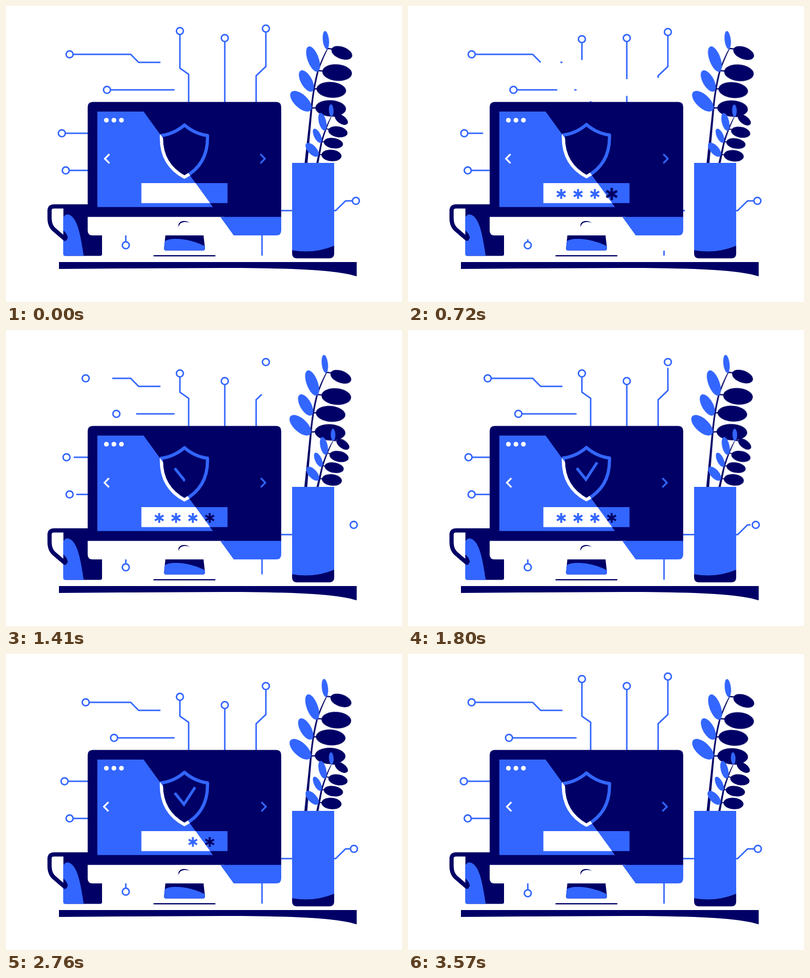
Write an HTML page that moves like this. It is 800x600 px and loops after 3.6 s.

```html
<!DOCTYPE html>
<html lang="en">
<head>
<meta charset="utf-8">
<title>Secure login</title>
<style>
  html, body { margin: 0; width: 100%; height: 100%; overflow: hidden; background: #fff; }
  svg { display: block; width: 100vw; height: 100vh; }
  :root { --sine: cubic-bezier(.37, 0, .63, 1); }

  .dark { fill: #006; }
  .blue { fill: #36f; }
  .white { fill: #fff; }
  .line { fill: none; stroke: #36f; stroke-width: 3; }
  .stem { fill: none; stroke: #006; }

  .tall, .short, .leaf, .shield, .prev, .next { animation: 1800ms var(--sine) infinite alternate; }
  .tall { transform-origin: 604px 400px; animation-name: lean-left; animation-delay: -3350ms; }
  .short { transform-origin: 628px 330px; animation-name: lean-right; animation-delay: -400ms; }
  .leaf { transform-box: fill-box; transform-origin: 0 50%; animation-name: nod; animation-delay: -900ms; }
  .shield { animation-name: bob; }
  .prev, .next { animation-duration: 900ms; }
  .prev { animation-name: nudge-left; }
  .next { animation-name: nudge-right; }
  .star { transform: scale(0); animation: pop 3600ms var(--sine) infinite; }
  .star:nth-child(2) { animation-delay: 150ms; }
  .star:nth-child(3) { animation-delay: 300ms; }
  .star:nth-child(4) { animation-delay: 450ms; }
  .check { stroke-width: 5.5; stroke-dasharray: 1 2; animation: tick 3600ms var(--sine) infinite; }

  @keyframes lean-left { to { transform: rotate(-.54deg); } }
  @keyframes lean-right { from { transform: rotate(-.2deg); } to { transform: rotate(1.8deg); } }
  @keyframes nod { from { transform: rotate(-1deg); } to { transform: rotate(1deg); } }
  @keyframes bob { to { transform: translateY(-3px); } }
  @keyframes nudge-left { to { transform: translateX(-2px); } }
  @keyframes nudge-right { to { transform: translateX(2px); } }
  @keyframes pop {
    0%, 3.9% { transform: scale(0); }
    7.5% { transform: scale(1.25); }
    10.8%, 68% { transform: scale(1); }
    72%, 100% { transform: scale(0); }
  }
  @keyframes tick {
    0%, 33.3% { stroke-dashoffset: 1.02; }
    45.8%, 77.8% { stroke-dashoffset: 0; }
    93.9%, 100% { stroke-dashoffset: -1.02; }
  }
</style>
</head>
<body>
<svg viewBox="0 0 800 600">
  <defs>
    <clipPath id="left"><path d="M0 0H122.9L557.9 600H0Z" id="half"/></clipPath>
    <path id="badge" d="M360.5 241.2Q381 259 407 262.5C408.500 303 392 330 360.500 347C329 330 312.500 303 314 262.500Q340 259 360.500 241.200Z"/>
    <path id="asterisk" d="M0 -10V10M-8.700 -5L8.700 5M-8.700 5L8.700 -5" stroke-width="4"/>
  </defs>

  <g id="wires"></g>

  <!-- desk and mug -->
  <path class="dark" d="M107 519H708.500V548C670 535 580 531 440 531L236 532L107 533Z"/>
  <path class="dark" d="M116 403H194V503Q194 506.500 190 506.500H120Q116 506.500 116 502Z"/>
  <path class="blue" d="M115.500 502V430Q118 422 125 422.500C145 426 151 468 157 506.500H120Q115.500 506.500 115.500 502Z"/>
  <path class="stem" stroke-width="8.500" stroke-linecap="round" d="M168 406.200H97Q88 406.200 88 415V430Q88 446 98 454L119 472"/>
  <path class="dark" d="M116 455Q124 462 125 471L116 474Z"/>

  <!-- monitor -->
  <path class="dark" d="M322 465H399L402 491Q402 495.500 398 495.500H323Q319 495.500 319.300 491Z"/>
  <path class="blue" d="M321 476.500C337 467 376 473 402 487V491Q402 495.500 398 495.500H323Q319 495.500 319.300 491Z"/>
  <path class="stem" stroke-width="2.400" d="M298 506.300H423"/>
  <path class="dark" d="M165 428V205Q165 194.500 175 194.500H546Q556 194.500 556 205V428Z"/>
  <path class="white" d="M165 427.500H440L465 465H175Q165 465 165 455Z"/>
  <path class="blue" d="M433 427.500H556V455Q556 465 546 465H460Z"/>
  <path class="dark" d="M349 448C345 437 360 431 372 440C361 435.500 350 438 349 448Z"/>
  <path class="blue" d="M184.500 214H278L418 407.500H184.500Z"/>
  <g class="white">
    <circle cx="202.800" cy="231.500" r="4.800"/>
    <circle cx="218" cy="231.500" r="4.800"/>
    <circle cx="233.200" cy="231.500" r="4.800"/>
  </g>
  <path class="line prev" style="stroke:#fff;stroke-width:3.500px" d="M208.800 300.300L199.800 309.500L208.800 318.700"/>
  <path class="line next" style="stroke-width:3.500px" d="M514 300.300L523 309.500L514 318.700"/>

  <g class="shield">
    <use href="#badge" class="dark" stroke="#36f" stroke-width="6.500" stroke-linejoin="round"/>
    <path class="line check" pathLength="1" d="M341 283L359.500 306L382 271.500"/>
  </g>
  <g clip-path="url(#left)">
    <g class="shield"><use href="#badge" fill="none" stroke="#fff" stroke-width="6.500" stroke-linejoin="round"/></g>
  </g>

  <path class="blue" d="M273.500 359H447.500V399.500H273.500Z"/>
  <path class="white" d="M273.500 359H383L412.300 399.500H273.500Z"/>
  <g id="stars" fill="none"></g>

  <!-- plants -->
  <g class="tall">
    <path class="dark" d="M602 330L615.500 207C619 175 624 148 629 131Q637 108 649 86L650.500 86.500Q639 110 632 131C626 155 622 176 619 207L608 330Z"/>
    <path class="stem" stroke-width="2.500" d="M617 207L630 206M621 168L632 168M630 131L643 132M649 86L661 87.500"/>
    <g class="blue">
      <ellipse cx="646.400" cy="69" rx="6.300" ry="18.300" transform="rotate(-6 646.400 69)"/>
      <ellipse cx="620.500" cy="107.500" rx="11.300" ry="27" transform="rotate(-20 620.500 107.500)"/>
      <ellipse cx="607" cy="152" rx="11.300" ry="24" transform="rotate(-29 607 152)"/>
      <ellipse cx="596" cy="193" rx="13.500" ry="27" transform="rotate(-47 596 193)"/>
    </g>
    <g class="dark">
      <g class="leaf"><ellipse cx="678.500" cy="95" rx="22" ry="12.300" transform="rotate(21 678.500 95)"/></g>
      <g class="leaf"><ellipse cx="669" cy="135" rx="30" ry="16.700" transform="rotate(5 669 135)"/></g>
      <g class="leaf"><ellipse cx="657.300" cy="170" rx="30" ry="16" transform="rotate(5 657.300 170)"/></g>
      <g class="leaf"><ellipse cx="656" cy="207.500" rx="31" ry="16.500" transform="rotate(3 656 207.500)"/></g>
    </g>
  </g>
  <g class="short">
    <path class="dark" d="M625.500 325L636 275Q644 247 657.500 222L658.300 222.500Q646 250 639 276L630 325Z"/>
    <path class="stem" stroke-width="1.800" d="M632 301L640 301.500M638 275L645 275.500M646 249L654 250M657.500 223L667 223.500"/>
    <g class="blue">
      <ellipse cx="657" cy="211.500" rx="4.700" ry="12.300" transform="rotate(-3 657 211.500)"/>
      <ellipse cx="639.300" cy="234.500" rx="7.500" ry="18.200" transform="rotate(-14 639.300 234.500)"/>
      <ellipse cx="629" cy="263" rx="6.800" ry="15.600" transform="rotate(-26 629 263)"/>
      <ellipse cx="618.500" cy="291.500" rx="8.800" ry="17.300" transform="rotate(-43 618.500 291.500)"/>
    </g>
    <g class="dark">
      <ellipse cx="677.500" cy="230" rx="15" ry="8.300" transform="rotate(35 677.500 230)"/>
      <ellipse cx="670.500" cy="255" rx="19.600" ry="10.800" transform="rotate(10 670.500 255)"/>
      <ellipse cx="661.300" cy="278" rx="19.600" ry="10.500" transform="rotate(9 661.300 278)"/>
      <ellipse cx="657.500" cy="303" rx="20.300" ry="11.600" transform="rotate(5 657.500 303)"/>
    </g>
  </g>

  <path class="blue" d="M578 318H663V500H578Z"/>
  <path class="dark" d="M578 495Q622 503 663 486V502Q663 511.500 653 511.500H588Q578 511.500 578 502Z"/>
</svg>

<script>
  const LOOP = 3600, R = 7;

  // pts: far end to last corner; axis and dir: where the node lies from there.
  // home, inner, over: node rest, pulled-in and overshoot places.
  // pull, cut, mend: [start, length]; push: [start, peak].
  const wires = [
    { pts: [[312, 114.3], [268, 114.3], [252, 98]], axis: 0, dir: -1, home: 128.5, inner: 161, over: 124,
      pull: [690, 676], push: [2850, 3320], cut: [352, 1129], mend: [572, 1540] },
    { pts: [[340.5, 170]], axis: 0, dir: -1, home: 204, inner: 223, over: 200.5,
      pull: [400, 660], push: [2600, 3130], cut: [115, 1636], mend: [537, 1550] },
    { pts: [[369, 196], [369, 138.5], [351.3, 126]], axis: 1, dir: -1, home: 50.7, inner: 88, over: 46,
      pull: [167, 1196], push: [2700, 3250], cut: [296, 711], mend: [658, 692] },
    { pts: [[442, 196]], axis: 1, dir: -1, home: 65, inner: 103.5, over: 61,
      pull: [700, 576], push: [2920, 3400], cut: [124, 1400], mend: [397, 1500] },
    { pts: [[505.3, 196], [505.3, 141.5], [525, 122.5]], axis: 1, dir: -1, home: 45.7, inner: 65, over: 41.5,
      pull: [278, 1078], push: [2840, 3320], cut: [61, 1690], mend: [706, 1478] },
    { pts: [[166, 258]], axis: 0, dir: -1, home: 112.8, inner: 122.3, over: 110.5,
      pull: [594, 615], push: [2500, 3150], cut: [450, 720], mend: [1060, 600] },
    { pts: [[166, 333.3]], axis: 0, dir: -1, home: 120.7, inner: 128.5, over: 119,
      pull: [700, 655], push: [2860, 3320], cut: [670, 450], mend: [1060, 600] },
    { pts: [[555, 414.8], [666, 414.8], [686, 395]], axis: 0, dir: 1, home: 706.8, inner: 702.5, over: 709.5,
      pull: [485, 758], push: [2690, 3130], cut: [100, 1170], mend: [560, 1450] },
    { pts: [[242, 465]], axis: 1, dir: 1, home: 485, inner: 481, over: 487.5,
      pull: [720, 720], push: [2650, 3130], cut: [200, 900], mend: [800, 850] },
    { pts: [[517.2, 465]], axis: 1, dir: 1, bare: true, home: 513, inner: 513, over: 513,
      pull: [0, 1], push: [2700, 3100], cut: [398, 480], mend: [1080, 500] }
  ];

  function add(parent, tag, attrs) {
    const el = document.createElementNS("http://www.w3.org/2000/svg", tag);
    for (const key in attrs) el.setAttribute(key, attrs[key]);
    return parent.appendChild(el);
  }

  const ease = (t, start, length) => {
    const p = Math.min(1, Math.max(0, (t - start) / length));
    return (1 - Math.cos(Math.PI * p)) / 2;
  };
  const mix = (a, b, p) => a + (b - a) * p;

  const layer = document.getElementById("wires");
  for (const w of wires) {
    w.path = add(layer, "path", { class: "line" });
    if (!w.bare) w.ring = add(layer, "circle", { class: "line", r: R });
    w.size = route(w, w.home).reduce((sum, p, i, all) =>
      i ? sum + Math.hypot(p[0] - all[i - 1][0], p[1] - all[i - 1][1]) : 0, 0);
  }

  const stars = document.getElementById("stars");
  for (let i = 0; i < 4; i++) {
    const spot = add(stars, "g", { class: "star", style: `transform-origin:${309.5 + 34 * i}px 381px` });
    add(spot, "use", { href: "#asterisk", x: 309.5 + 34 * i, y: 381, stroke: i < 3 ? "#36f" : "#006" });
  }

  function route(w, pos) {
    const end = w.pts[w.pts.length - 1].slice();
    end[w.axis] = pos - w.dir * R;
    return [...w.pts, end];
  }

  function place(w, t) {
    const [start, peak] = w.push;
    if (t < start) return mix(w.home, w.inner, ease(t, ...w.pull));
    if (t < peak) return mix(w.inner, w.over, ease(t, start, peak - start));
    return mix(w.over, w.home, ease(t, peak, 3570 - peak));
  }

  function draw(t) {
    for (const w of wires) {
      const pos = place(w, t);
      const pts = route(w, pos);
      const front = w.size * ease(t, ...w.cut);
      const back = Math.min(front, w.size * ease(t, ...w.mend));
      w.path.setAttribute("d", "M" + pts.join("L"));
      w.path.setAttribute("stroke-dasharray", front > back ? `${back} ${front - back} 999 0` : "none");
      if (w.ring) {
        const node = pts[pts.length - 1];
        w.ring.setAttribute("cx", w.axis ? node[0] : pos);
        w.ring.setAttribute("cy", w.axis ? pos : node[1]);
      }
    }
  }

  let began;
  function frame(now) {
    began ??= now;
    draw((now - began) % LOOP);
    requestAnimationFrame(frame);
  }
  draw(0);
  requestAnimationFrame(frame);
</script>
</body>
</html>
```
